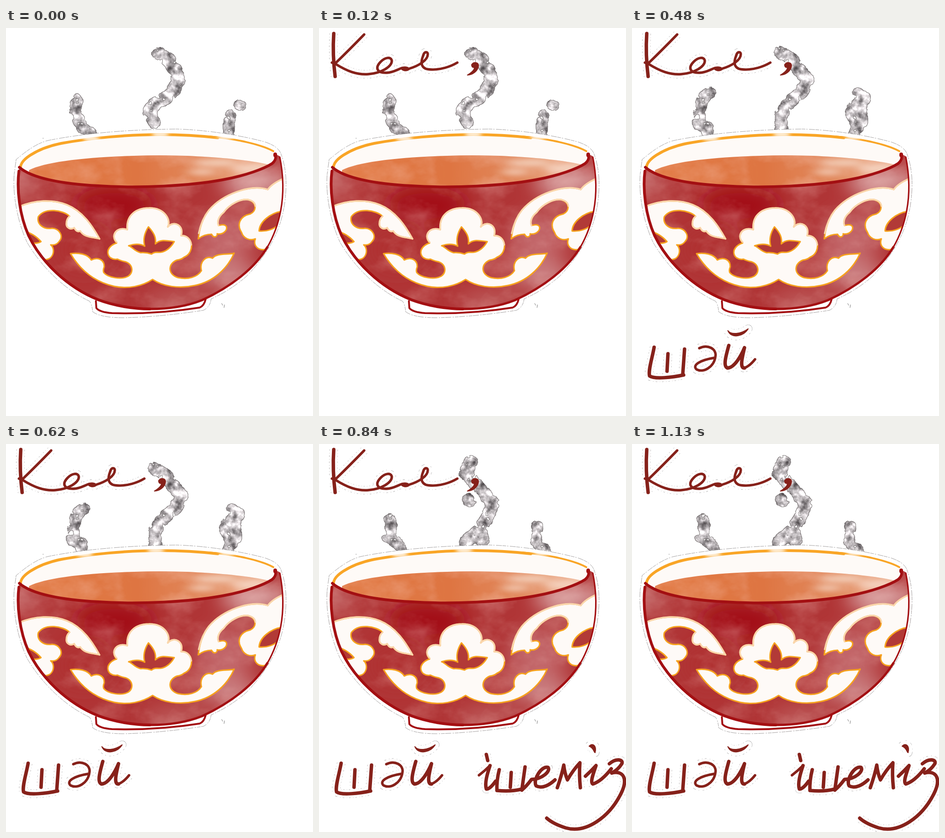
Recreate the animation shown at these times as an HTML page. Size 666 by 841 pixels, loop 1320 ms.

```html
<!DOCTYPE html>
<html lang="kk">
<head>
<meta charset="utf-8">
<title>Кел, шәй ішеміз</title>
<style>
html, body { margin: 0; width: 100%; height: 100%; overflow: hidden; background: #fff; }
svg { display: block; width: 100vw; height: 100vh; }
path { stroke-linecap: round; stroke-linejoin: round; }
.line { fill: none; }
.ink { fill: none; stroke: #86211a; stroke-width: 7.5; }
.thin { stroke-width: 5.4; }
.solid { fill: #86211a; stroke-width: 2; }
.halo path { fill: none; stroke: #fff; stroke-width: 17; }
.halo path.dots { stroke: #999; stroke-width: 18.2; stroke-linecap: butt; stroke-dasharray: 3 5 1 4; }
.cream { fill: #fefaf7; stroke: #f6a21d; stroke-width: 3; }
.peach { fill: none; stroke: #fad6ac; stroke-width: 3.4; }
.leaf { stroke: #f6a21d; stroke-width: 3; fill: #b23a37; }
</style>
</head>
<body>
<svg viewBox="0 0 666 841" preserveAspectRatio="none" role="img" aria-label="Кел, шәй ішеміз">
<defs>
  <filter id="smoke" filterUnits="userSpaceOnUse" x="90" y="-10" width="460" height="260" color-interpolation-filters="sRGB">
    <feGaussianBlur in="SourceGraphic" stdDeviation="3.5" result="soft"/>
    <feTurbulence type="fractalNoise" baseFrequency=".075" numOctaves="4" seed="8" result="rough"/>
    <feComposite in="soft" in2="rough" operator="arithmetic" k1="2"/>
    <feComponentTransfer result="shape"><feFuncA type="linear" slope="12" intercept="-5.6"/></feComponentTransfer>
    <feMorphology in="shape" operator="erode" radius=".8" result="core"/>
    <feTurbulence type="fractalNoise" baseFrequency=".06" numOctaves="4" seed="21"/>
    <feColorMatrix values="1.3 0 0 0 .13  1.3 0 0 0 .11  1.3 0 0 0 .12  0 0 0 0 1"/>
    <feComposite in2="shape" operator="in" result="cloud"/>
    <feFlood flood-color="#686262" flood-opacity=".75"/>
    <feComposite in2="shape" operator="in"/>
    <feComposite in2="core" operator="out" result="edge"/>
    <feMerge><feMergeNode in="cloud"/><feMergeNode in="edge"/></feMerge>
  </filter>
  <filter id="wash" x="0" y="0" width="1" height="1" color-interpolation-filters="sRGB">
    <feTurbulence type="fractalNoise" baseFrequency=".012 .017" numOctaves="5" seed="5"/>
    <feColorMatrix values="0 0 0 0 1  0 0 0 0 .86  0 0 0 0 .83  1.5 0 0 0 -.62"/>
  </filter>
  <filter id="blur" x="-1" y="-1" width="3" height="3"><feGaussianBlur stdDeviation="20"/></filter>
  <filter id="mist" x="-1" y="-1" width="3" height="3"><feGaussianBlur stdDeviation="14 6"/></filter>
  <filter id="haze" x="-1" y="-1" width="3" height="3"><feGaussianBlur stdDeviation="4 2"/></filter>
  <linearGradient id="teaTone">
    <stop offset="0" stop-color="#e27b45"/><stop offset=".45" stop-color="#de7542"/>
    <stop offset=".75" stop-color="#e28b60"/><stop offset="1" stop-color="#edb494"/>
  </linearGradient>
  <path id="body" d="M28 310C23 350 29 405 49 450C77 508 133 562 200 589C237 603 280 609 312 609C355 609 395 602 425 590C490 560 540 520 567 475C590 435 612 370 594 278L584 273C586 280 586 287 577 294C560 305 520 320 470 329C400 342 290 348 200 342C120 338 55 325 29 302Z"/>
  <path id="tea" d="M50 308C90 288 190 278 320 276C420 275 530 285 573 297C555 308 520 320 470 329C400 342 290 348 200 342C130 338 80 330 50 314Z"/>
  <clipPath id="inBody"><use href="#body"/></clipPath>
  <clipPath id="inTea"><use href="#tea"/></clipPath>
</defs>

<rect width="666" height="841" fill="#fff"/>
<g id="halos"></g>
<g id="steam" filter="url(#smoke)" fill="none" stroke="#000"></g>

<path fill="#fff" stroke="#8d8989" stroke-width=".8" stroke-dasharray="7 3 2 4 12 2" d="M22 285C45 266 65 251 90 244C180 226 280 220 370 219C440 221 515 234 562 247Q592 257 597 274Q610 310 607 355C603 425 577 480 522 538Q485 570 445 587Q443 605 428 612C370 621 310 627 255 628Q205 628 188 615Q187 600 181 592C125 566 75 515 46 465C22 415 14 350 18 315Z"/>
<path class="line" stroke="#777" stroke-width="1" d="M468 597l2 4M474 600l-1 6M80 239h1"/>

<path fill="#fefaf7" d="M29 302C22 280 70 259 120 249C180 238 260 231 335 231C430 232 540 245 584 269L577 294C500 330 300 350 200 342C120 338 55 325 29 302Z"/>
<use href="#tea" fill="url(#teaTone)"/>
<g clip-path="url(#inTea)">
  <rect x="40" y="270" width="540" height="80" filter="url(#wash)" opacity=".5"/>
  <g filter="url(#mist)" fill="#f6dccb" opacity=".75">
    <ellipse cx="455" cy="292" rx="50" ry="9"/><ellipse cx="425" cy="312" rx="30" ry="7"/><ellipse cx="535" cy="305" rx="45" ry="9"/>
  </g>
</g>
<g class="line" stroke="#f9a526">
  <path stroke-width="6" d="M34 310C20 288 70 260 120 250C180 239 260 231 335 231C380 231 425 234 460 238"/>
  <path stroke-width="4" d="M440 235C500 240 555 253 580 267"/>
</g>
<g id="rimHaze" fill="#fffdfb" filter="url(#haze)"></g>

<path fill="#fff" d="M195 588L196 607Q203 616 230 618C300 620 370 614 420 606Q432 602 433 585Z"/>
<path class="line" stroke="#a30f12" stroke-width="4" d="M195 592L196 607Q203 616 230 618C300 620 370 614 420 606Q430 602 433 588"/>

<use href="#body" fill="#b03536"/>
<g clip-path="url(#inBody)">
  <g filter="url(#blur)">
    <ellipse cx="235" cy="385" rx="85" ry="42" fill="#a31012"/>
    <ellipse cx="170" cy="480" rx="60" ry="45" fill="#b03233"/>
    <ellipse cx="540" cy="335" rx="75" ry="30" fill="#d59c9d"/>
    <ellipse cx="475" cy="455" rx="65" ry="55" fill="#c26568"/>
    <ellipse cx="485" cy="535" rx="70" ry="28" fill="#cb8082"/>
    <ellipse cx="370" cy="590" rx="70" ry="16" fill="#c16565"/>
    <ellipse cx="40" cy="335" rx="24" ry="14" fill="#d59b9b"/>
  </g>
  <rect x="20" y="270" width="590" height="345" filter="url(#wash)" opacity=".4"/>

  <path class="cream" d="M20 391C62 370 105 372 132 383C167 397 188 430 203 457C187 453 169 454 161 440C154 444 149 436 148 433C140 439 130 432 131 424C131 415 134 411 138 408C124 395 85 388 70 409C66 426 82 437 100 434C116 435 126 451 115 463C110 470 103 471 97 470C107 477 105 501 85 502L40 500L15 400Z"/>
  <path class="peach" d="M20 391C62 370 105 372 132 383C167 397 188 430 203 457C187 453 169 454 161 440C154 444 149 436 148 433C140 439 130 432 131 424C131 415 134 411 138 408"/>
  <path class="leaf" d="M38 440Q60 445 76 463Q66 469 55 465Z"/>

  <path class="cream" d="M612 322Q578 335 568 350C530 338 470 360 440 395C425 414 420 435 417 457Q430 447 446 447C451 457 459 452 458 446C470 449 481 439 478 430Q474 424 461 428C457 418 463 407 472 400C485 381 510 370 525 372C545 378 544 397 530 403C507 408 500 426 511 443C515 456 529 462 541 457C536 470 545 483 562 480L620 410Z"/>
  <path class="peach" d="M612 322Q578 335 568 350C530 338 470 360 440 395C425 414 420 435 418 445M461 428C457 418 463 407 472 400C485 381 510 370 525 372Q540 375 541 386"/>
  <path class="leaf" d="M549 440C550 420 573 401 600 397L592 426C580 437 564 441 549 440Z"/>

  <path class="cream" d="M318 545C295 560 265 566 235 560C190 550 160 523 140 489C157 487 177 489 185 503C200 495 214 503 213 518Q210 525 212 530C221 541 250 546 265 538C279 529 274 509 256 506Q247 504 242 501C219 505 210 476 240 466C226 451 239 429 263 437C260 405 283 390 310 390C343 389 359 415 351 431C365 416 387 428 380 450C405 448 412 486 386 497Q380 502 371 503C352 510 349 533 373 541C395 546 415 540 424 526C419 506 435 492 448 499C458 487 480 492 495 488C480 522 450 550 410 558C375 566 340 560 318 545Z"/>
  <path class="peach" d="M240 464C226 451 239 429 263 437C260 405 283 390 310 390C343 389 359 415 351 431C365 416 387 428 380 450C392 449 401 458 402 470"/>
  <path class="leaf" d="M309 431C321 444 326 454 324 468C335 457 350 461 365 463C355 481 340 488 328 486Q320 486 316 490Q304 486 292 487C277 483 274 474 266 472Q287 465 301 473C297 459 300 445 309 431Z"/>
</g>

<g class="line" stroke="#a30f12">
  <path stroke-width="6" d="M28 310C23 350 29 405 49 450C77 508 133 562 200 589C237 603 280 609 312 609"/>
  <path stroke-width="5" d="M312 609C355 609 395 602 425 590C490 560 540 520 567 475"/>
  <path stroke-width="3.2" d="M567 475C590 435 612 370 594 280"/>
  <path stroke-width="6" d="M29 302C55 325 120 338 200 342C290 348 400 342 470 329C520 320 560 305 577 294C586 287 586 280 584 273"/>
  <path stroke-width="8" d="M584 274L584 276"/>
</g>
<g id="words"></g>
</svg>

<script>
const LOOP = 1320;
const $ = id => document.getElementById(id);

// each word: [start time, [class, path]...]
const words = [
  [120,
    ["", "M32 12Q29 58 35 105"],
    ["thin", "M98 14Q65 48 36 76M28 75L36 78"],
    ["thin", "M36 78C60 93 82 102 107 100C135 98 158 84 158 71C156 61 143 64 134 73C121 86 125 98 147 97C168 96 178 82 192 87"],
    ["thin", "M180 88Q187 94 196 88C216 82 236 70 236 57C236 50 228 51 226 60"],
    ["thin", "M226 60C219 77 222 90 243 90C263 91 285 84 300 75"],
    ["solid bare", "M331 80C334 73 346 73 346 82C345 94 332 102 322 102C330 97 338 90 337 85Q332 87 331 80Z"]],
  [480,
    ["", "M48 692C44 715 35 741 38 754C48 762 90 757 112 752M78 706L76 744M114 696L110 752"],
    ["thin", "M146 694C164 685 184 695 181 712C178 735 155 748 140 740C130 731 147 720 178 715"],
    ["", "M210 688C204 710 197 733 207 737C222 737 237 710 244 693C238 718 234 737 244 737"],
    ["thin", "M244 737Q256 732 267 718"],
    ["solid", "M208 656C215 665 235 664 252 652C243 668 216 675 208 656Z"]],
  [840,
    ["thin", "M347 718Q360 708 371 697"],
    ["", "M371 697C365 715 359 735 363 748Q371 748 383 731"],
    ["", "M363 673L366 686M391 706Q385 730 386 751Q416 754 440 748M417 712L415 744M447 700L440 750"],
    ["", "M440 750Q450 742 461 727C485 726 503 709 497 701C484 696 463 727 471 741C484 748 500 739 512 728"],
    ["", "M517 745Q527 716 531 696Q533 714 539 728Q551 707 566 691Q564 717 567 745"],
    ["", "M578 720Q590 709 601 697C594 717 588 733 594 737Q613 731 634 704"],
    ["solid", "M586 655C593 647 603 653 599 669C596 670 598 660 586 655Z"],
    ["", "M630 693C645 680 661 684 657 693Q648 707 635 713"],
    ["", "M635 713C661 707 671 726 655 758C630 808 580 845 535 832Q507 823 494 811"]]
];

// each pose: start, left, middle and right plume, haze spots on the rim
const poses = [
  [0, "M155 156L147 177L158 200L166 217L186 230",
    "M330 55L350 66L368 92L375 115L357 145L320 167L310 182L322 204", "M487 189L483 209L484 232M505 166L510 168", [185, 335, 477]],
  [480, "M170 139L152 154L147 180L143 208L165 215L163 234",
    "M322 53L344 66L362 90L381 112L368 138L344 159L324 184L324 222", "M490 140L508 153L480 168L474 188L490 211M500 175L500 205L481 230", [170, 325, 482]],
  [720, "M134 158L151 170L129 188L142 207L160 217L150 236",
    "M316 6L319 35L330 60L350 78L372 98L376 134L345 156L320 182L315 220M350 85L328 108L333 142", "M487 170L475 188L490 202L477 217L492 232", [150, 320, 483]],
  [840, "M153 163L157 178L148 200L171 215L180 232",
    "M330 38L317 62L338 84L357 106L378 128L366 157L350 185L318 212M350 190L355 208M324 121L327 123", "M473 177L474 200L470 214L492 230", [175, 315, 485]]
];
const widths = [26, 29, 24];

const tag = (d, extra) => `<path d="${d}" ${extra}/>`;

for (const [, ...strokes] of words) {
  const outlined = strokes.filter(([cls]) => !cls.includes("bare"));
  const layer = cls => outlined.map(([, d]) => tag(d, `class="${cls}"`)).join("");
  $("halos").innerHTML += `<g class="halo">${layer("dots")}${layer("")}</g>`;
  $("words").innerHTML += `<g>${strokes.map(([cls, d]) => tag(d, `class="ink ${cls}"`)).join("")}</g>`;
}

let shown = -1;
function setPose(i) {
  if (i === shown) return;
  shown = i;
  const [, left, middle, right, spots] = poses[i];
  $("steam").innerHTML = [left, middle, right]
    .map((d, k) => tag(d, `stroke-width="${widths[k]}"`)).join("");
  $("rimHaze").innerHTML = spots
    .map((x, k) => `<ellipse cx="${x}" cy="${[240, 231, 237][k]}" rx="18" ry="5" opacity=".8"/>`).join("");
}

function draw(t) {
  words.forEach(([start], i) => {
    const view = t >= start ? "visible" : "hidden";
    $("halos").children[i].setAttribute("visibility", view);
    $("words").children[i].setAttribute("visibility", view);
  });
  setPose(poses.filter(([start]) => t >= start).length - 1);
}

const begin = performance.now();
function tick() {
  draw((performance.now() - begin) % LOOP);
  requestAnimationFrame(tick);
}
tick();
</script>
</body>
</html>
```
